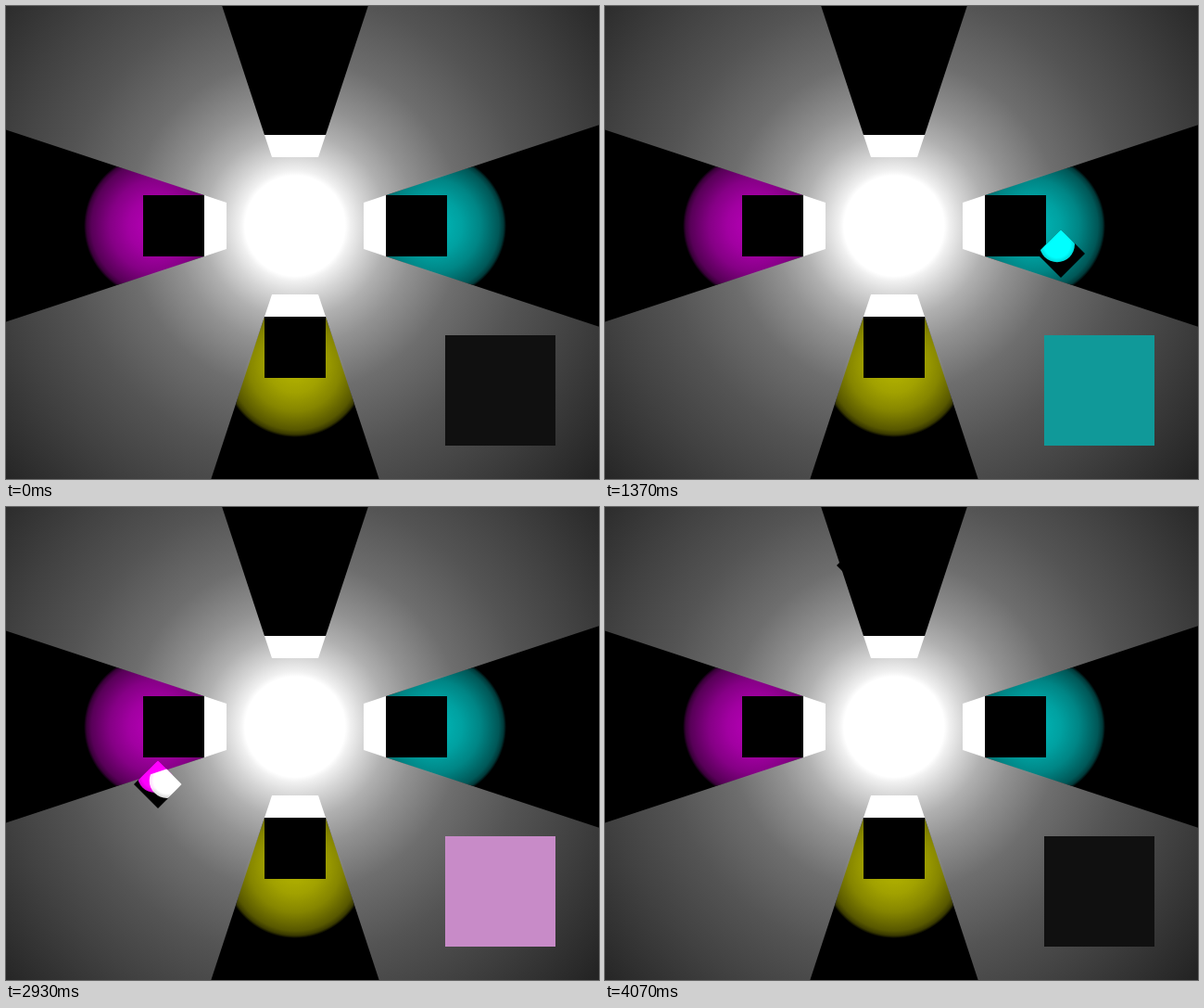
Animation, 640 px wide and 510 px high, one loop 4130 ms. Source, as an HTML page with a canvas:

```html
<!DOCTYPE html>
<html lang="en">
<head>
<meta charset="utf-8">
<title>Light probe</title>
<style>
html, body { margin: 0; height: 100%; overflow: hidden; background: #000; }
canvas { display: block; }
</style>
</head>
<body>
<canvas id="stage" width="640" height="510"></canvas>
<script>
const CX = 312, CY = 237, SLOPE = 0.331, PATH = 210, HALF = 26, DISC = 19;
const LOOP = 4130, STEP = 62.5, LAST = 65;
const ctx = document.getElementById('stage').getContext('2d');

const layer = (w, h) => {
  const c = document.createElement('canvas');
  c.width = w;
  c.height = h;
  return c;
};
const scene = layer(640, 510);
const probe = layer(2 * HALF, 2 * HALF);
const pg = probe.getContext('2d', { willReadFrequently: true });

// Directions out of the centre, with the colour of the lamp behind each block
const lamps = [
  { dx: 1, dy: 0, rgb: [0, 255, 255] },
  { dx: 0, dy: 1, rgb: [255, 255, 0] },
  { dx: -1, dy: 0, rgb: [255, 0, 255] }
];

const radial = (g, x, y, r, stops) => {
  const fill = g.createRadialGradient(x, y, 0, x, y, r);
  stops.forEach(([d, color]) => fill.addColorStop(d / r, color));
  return fill;
};
const gray = v => `rgb(${v},${v},${v})`;
const tint = (rgb, k) => `rgb(${rgb.map(v => Math.round(v * k)).join()})`;

function disc(g, x, y, r, fill) {
  g.fillStyle = fill;
  g.beginPath();
  g.arc(x, y, r, 0, 7);
  g.fill();
}

function polygon(g, points, fill) {
  g.fillStyle = fill;
  g.beginPath();
  points.forEach(p => g.lineTo(...p));
  g.fill();
}

function quarters(g, draw) {
  for (let i = 0; i < 4; i++) {
    g.save();
    g.translate(CX, CY);
    g.rotate(i * Math.PI / 2);
    draw();
    g.restore();
  }
}

function drawScene() {
  const g = scene.getContext('2d');
  const tones = [[0, 255], [54, 255], [60, 240], [75, 214], [100, 176], [130, 146],
    [180, 110], [250, 84], [320, 65], [400, 42], [420, 36]];
  g.fillStyle = radial(g, CX, CY, 420, tones.map(([d, v]) => [d, gray(v)]));
  g.fillRect(0, 0, 640, 510);
  quarters(g, () => {
    const far = 450, h = far * SLOPE;
    polygon(g, [[98, -33], [far, -h], [far, h], [98, 33]], '#000');
  });
  g.globalCompositeOperation = 'lighten';
  for (const { dx, dy, rgb } of lamps) {
    const x = CX + 150 * dx, y = CY + 150 * dy;
    const stops = [[0, 0.72], [30, 0.63], [50, 0.52], [70, 0.34], [75, 0.22], [78, 0]];
    disc(g, x, y, 78, radial(g, x, y, 78, stops.map(([d, k]) => [d, tint(rgb, k)])));
  }
  g.globalCompositeOperation = 'source-over';
  quarters(g, () => {
    polygon(g, [[74, -25], [98, -33], [98, 33], [74, 25]], '#fff');
    g.fillStyle = '#000';
    g.fillRect(98, -33, 66, 66);
  });
}

// Bright spot inside the probe, shifted towards the light at (lx, ly)
function spot(x, y, lx, ly, rgb, k) {
  const d = Math.hypot(lx - x, ly - y);
  const sx = x + (lx - x) / d * 10.5, sy = y + (ly - y) / d * 10.5;
  disc(pg, sx, sy, DISC, radial(pg, sx, sy, DISC,
    [[0, tint(rgb, k)], [14, tint(rgb, k)], [DISC, tint(rgb, k * 0.84)]]));
}

function clipToLit() {
  pg.beginPath();
  pg.rect(0, 0, 640, 510);
  quarters(pg, () => {
    pg.moveTo(0, 0);
    pg.lineTo(450, -450 * SLOPE);
    pg.lineTo(450, 450 * SLOPE);
    pg.closePath();
  });
  pg.clip('evenodd');
}

function drawProbe(x, y) {
  pg.clearRect(0, 0, 2 * HALF, 2 * HALF);
  pg.save();
  pg.translate(HALF - x, HALF - y);
  polygon(pg, [[x, y - HALF], [x + HALF, y], [x, y + HALF], [x - HALF, y]], '#000');
  pg.clip();
  pg.globalCompositeOperation = 'lighten';
  for (const { dx, dy, rgb } of lamps) {
    const d = Math.hypot(CX + 150 * dx - x, CY + 150 * dy - y);
    const k = Math.min(1, (125 - d) / 60);
    if (k > 0) spot(x, y, CX + 168 * dx, CY + 168 * dy, rgb, k);
  }
  clipToLit();
  spot(x, y, CX, CY, [255, 255, 255], 1);
  pg.restore();
}

// Mean colour of what the probe sees
function probeMean() {
  const { data } = pg.getImageData(0, 0, 2 * HALF, 2 * HALF);
  const sum = [0, 0, 0];
  for (let i = 0; i < data.length; i += 4)
    for (let c = 0; c < 3; c++) sum[c] += data[i + c];
  return sum.map(v => 16 + 0.92 * v / (2 * HALF * HALF));
}

function probePosition(s) {
  const side = Math.floor(s), f = s - side;
  const a = PATH * f, b = PATH * (1 - f);
  const [dx, dy] = [[a, -b], [b, a], [-a, b], [-b, -a]][side % 4];
  return [CX + dx, CY + dy];
}

function render(now) {
  const i = Math.min(LAST, Math.floor((now % LOOP + 8) / STEP));
  const [x, y] = probePosition(Math.max(0, i / 16 - 0.234));
  drawProbe(x, y);
  ctx.drawImage(scene, 0, 0);
  ctx.drawImage(probe, Math.round(x) - HALF, Math.round(y) - HALF);
  ctx.fillStyle = tint(probeMean(), 1);
  ctx.fillRect(474, 355, 119, 119);
}

drawScene();
let start;
function tick(now) {
  start ??= now;
  render(now - start);
  requestAnimationFrame(tick);
}
render(0);
requestAnimationFrame(tick);
</script>
</body>
</html>
```
